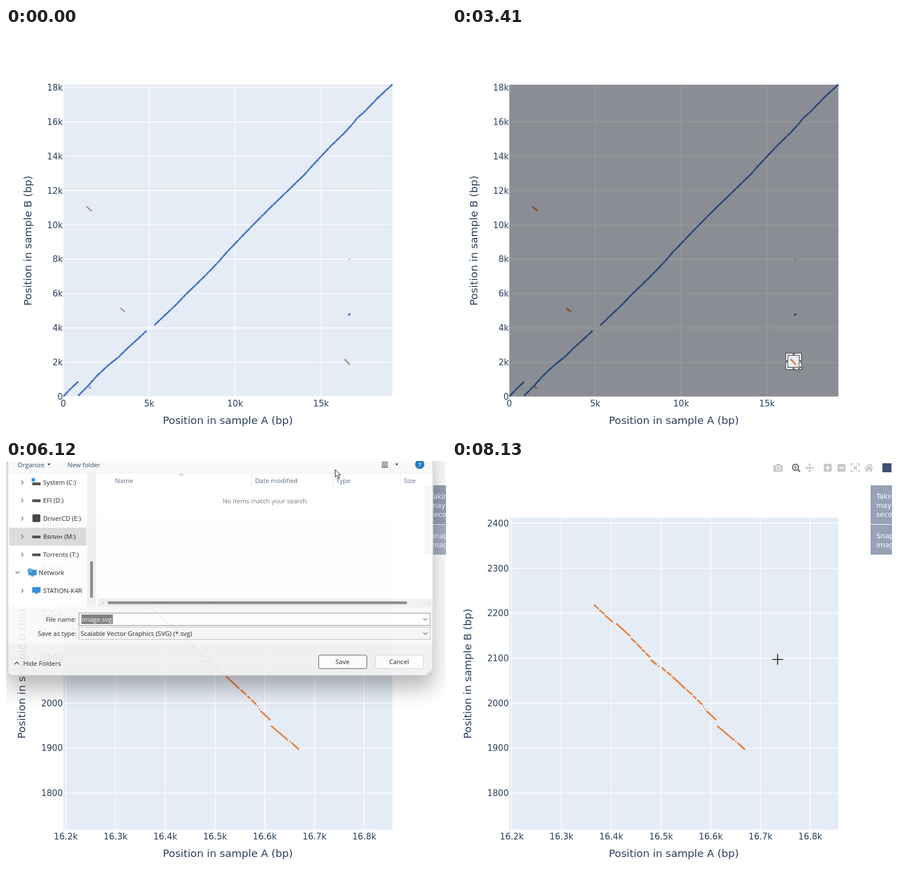
An HTML page that plays this animation: 780 by 718 pixels, repeating every 8.74 s.

```html
<!DOCTYPE html>
<html lang="en">
<head>
<meta charset="utf-8">
<title>Dot plot zoom and export</title>
<style>
  html, body { margin: 0; width: 100%; height: 100%; overflow: hidden; background: #fff; }
  svg { display: block; width: 780px; height: 718px; }
  .plot { font-family: "DejaVu Sans", Verdana, sans-serif; fill: #2a3f5f; }
  .tick { font-size: 15.1px; }
  .title { font-size: 18.5px; text-anchor: middle; }
  .note { font: 12.4px "DejaVu Sans", Verdana, sans-serif; fill: #fff; }
  .ui { font: 11.5px "Open Sans", "Noto Sans", sans-serif; fill: #111; }
  .line { fill: none; }
  #cross { mix-blend-mode: difference; }
</style>
</head>
<body>
<svg id="stage" viewBox="0 0 780 718" xmlns="http://www.w3.org/2000/svg"></svg>
<script>
const LOOP = 8740;
const BOX = { l: 101.5, t: 100.5, r: 685, b: 653.5 };
const START = { x: 596, y: 581 };

const text = (x, y, s, attrs = '') => `<text x="${x}" y="${y}" ${attrs}>${s}</text>`;
const rect = (x, y, w, h, fill, attrs = '') =>
  `<rect x="${x}" y="${y}" width="${w}" height="${h}" fill="${fill}" ${attrs}/>`;
const line = (d, color, width = 1, attrs = '') =>
  `<path class="line" d="${d}" stroke="${color}" stroke-width="${width}" ${attrs}/>`;
const range = n => [...Array(n).keys()];

// Axes: each has the pixel of its first tick, the step, the count and a label rule.
function axes(xa, ya, titleX) {
  const xs = range(xa.n).map(i => xa.at + i * xa.step);
  const ys = range(ya.n).map(i => ya.at - i * ya.step);
  const grid = xs.map(x => `M${x} ${BOX.t}V${BOX.b}`).join('') +
    ys.map(y => `M${BOX.l} ${y}H${BOX.r}`).join('');
  return rect(BOX.l, BOX.t, BOX.r - BOX.l, BOX.b - BOX.t, '#e5ecf6') +
    line(grid, '#fff', 1.35) +
    '<g class="plot">' +
    xs.map((x, i) => text(x, 670.5, xa.label(i), 'class="tick" text-anchor="middle"')).join('') +
    ys.map((y, i) => text(100.8, y + 5.5, ya.label(i), 'class="tick" text-anchor="end"')).join('') +
    text(393.25, 701.8, 'Position in sample A (bp)', 'class="title"') +
    text(0, 0, 'Position in sample B (bp)', `class="title" transform="translate(${titleX} 377) rotate(-90)"`) +
    '</g>';
}

function wholePlot() {
  const main = 'M102 653L114 640 128 627M128 652L146 634 150 629 163 615 180 599 200 583 214 569 235 550 249 537' +
    'M263 527L285 506 300 492 322 469 337 455 362 430 379 412 390 399 437 350 470 317 497 291 530 259 545 242' +
    ' 560 226 577 208 600 186 617 167 622 160 635 149 660 123 685 100';
  return axes(
    { at: 101.5, step: 152.35, n: 4, label: i => i ? i * 5 + 'k' : '0' },
    { at: 653.5, step: 60.88, n: 10, label: i => i ? i * 2 + 'k' : '0' }, 44.8) +
    line(main, '#7c9ad8', 2.5) +
    line(main, '#4472c4', 2.8, 'stroke-dasharray="13 1.4 6 1 19 1.6 4 1.2 9 1"') +
    line('M606.5 509.5L610.5 506.5', '#4472c4', 3) +
    line('M608 409.5L609.5 411', '#7c8db0', 2) +
    `<path id="inverted" class="line" d="M142.5 316.5L152 324.5M203 496.5L210.5 503M600 587L609.5 596.5M147 636L150.5 639"
      stroke-width="2.9"/>` +
    line('M600 587L604 591', '#e58a5c', 2.9, 'id="hint"');
}

function zoomPlot() {
  const runs = 'M252 255L260 262.5M261.5 264L270 271.5M271 273.5L285 285.5M291 288L316 310.5M317.5 314L326 322.5' +
    'M327.5 324L336 332.5M337 334L342 339M343.5 340.5L351 348M352.5 352.5L363 361M365.5 363L367 364.3M372 366L379 373' +
    'M381 374.5L389 380.5M390.5 382L414 404M416 405.5L426 414.5M428 416.5L433 421.5M435 423.5L444 432M445.5 434.5L446.5 435.7' +
    'M448.3 439.3L449.5 440.5M451 443L468.5 459M470 469.5L500 495M502.5 496.7L504 498M506 499.5L519.5 511.5';
  return axes(
    { at: 106, step: 88.2, n: 7, label: i => (16.2 + i / 10).toFixed(1) + 'k' },
    { at: 588.7, step: 79.73, n: 7, label: i => 1800 + i * 100 }, 34) +
    line(runs, '#ed7d31', 2.9);
}

function modebar() {
  const pale = '#c7c7c7', dark = '#7c7c7c';
  const tile = x => rect(x - 7, 5, 14, 14, pale, 'rx="2"');
  return `<g id="camera"><path d="M572 7.5h2.5l1.5-2.5h4.5l1.5 2.5h2a2 2 0 0 1 2 2v7.5a2 2 0 0 1-2 2h-12.500a2 2 0 0 1-2-2v-7.500a2 2 0 0 1 2-2z"/>
    <circle cx="578.200" cy="13" r="4.200" fill="#fff"/><circle cx="578.200" cy="13" r="2.700"/></g>` +
    `<circle cx="609" cy="11" r="5.300" fill="none" stroke="${dark}" stroke-width="2.500"/>` +
    line('M613 15L617 19', dark, 3) + line('M606 11H612M609 8V14', dark, 1.6) +
    line('M628 12H640M634 6V18', pale, 1.8) +
    `<path fill="${pale}" d="M634 3.500l3.200 4h-6.400zM634 20.500l3.200-4h-6.400zM625.800 12l4-3.200v6.400zM642.200 12l-4-3.200v6.400z"/>` +
    tile(666) + line('M662 12H670M666 8V16', '#fff', 2.2) +
    tile(690.5) + line('M686.500 12H694.500', '#fff', 2.2) +
    line('M707.500 9V5H711.500M718 5H722V9M722 15V19H718M711.500 19H707.500V15', pale, 1.7) +
    line('M711 8.500L718.500 15.500M718.500 8.500L711 15.500', pale, 1.9) +
    `<path fill="${pale}" d="M731 12.500L739 5L742 7.700V5.500H744V9.500L747 12.500L746 13.500L739 7.200L732 13.500ZM733.500 13.500L739 8.800L744.500 13.500V19H740.700V15H737.300V19H733.500Z"/>` +
    rect(763, 4, 16, 16, '#3f4f75');
}

function notice(id, y, h, rows) {
  return `<g id="${id}">` + rect(742, y, 160, h, '#97a1b7') +
    rows.map((s, i) => text(752, y + 23.5 + i * 16, s, 'class="note"')).join('') + '</g>';
}

function dialog() {
  const chevron = (x, y) => line(`M${x - 2} ${y - 3.5}l3.500 3.500l-3.500 3.500`, '#555', 1.1);
  const down = (x, y) => line(`M${x - 3.5} ${y - 2}l3.500 3.500l3.500-3.500`, '#555', 1.1);
  const caret = (x, y) => `<path d="M${x - 3} ${y - 1.5}h6l-3 3.500z" fill="#333"/>`;
  const drive = y => rect(44, y - 2, 15, 5, '#444', 'rx="1"');
  const screen = (x, y) => rect(x, y - 6, 15, 10, '#1f86d0', 'rx="1"') + rect(x + 5, y + 4, 5, 2, '#5d7487');
  const rows = ['System (C:)', 'EFI (D:)', 'DriverCD (E:)', 'Вялин (M:)', 'Torrents (T:)', '', 'STATION-K4R'];
  const rowY = i => 37.3 + i * 32.2;
  const tree = rect(3, 118, 138, 32, '#d9d9d9') +
    rows.map((s, i) => s ? chevron(26.5, rowY(i)) + text(63.5, rowY(i) + 4.2, s) : '').join('') +
    drive(39.3) + rect(43, 29.5, 6, 6, '#1f86d0') + drive(69.5) +
    rect(44.5, 94, 14, 14, '#333', 'rx="2"') + drive(134) + drive(166) +
    down(18, 198) + screen(37, 199) + '<circle cx="40" cy="195" r="4.500" fill="#4ba3d8"/>' +
    text(55.5, 202.4, 'Network') + screen(44, 230);
  const head = [[192, 'Name'], [442, 'Date modified'], [587, 'Type'], [707.5, 'Size']];
  return rect(0, -60, 760, 442, '#f0f0f0', 'rx="8" filter="url(#shadow)"') +
    rect(.5, -60, 759, 442, '#f0f0f0', 'rx="8" stroke="#b4b4b4"') +
    '<g class="ui">' +
    rect(1, -50, 758, 70, '#f9f9f9') + rect(1, 20, 758, 240, '#fff') + rect(1, 260, 758, 65, '#f9f9f9') +
    line('M1 20.500H759', '#ececec') +
    text(18, 9.7, 'Organize', 'fill="#1e395b"') + caret(74, 5) + text(107, 9.7, 'New folder', 'fill="#1e395b"') +
    line('M668 1H679M668 4H679M668 7H679M668 10H679', '#333', 1.3) + caret(695, 5) +
    '<circle cx="736" cy="5" r="8.300" fill="#0f6cbd"/>' + text(736, 9.5, '?', 'fill="#fff" text-anchor="middle" font-weight="600"') +
    `<g clip-path="url(#tree)">${tree}</g>` +
    rect(142, 21, 16, 239, '#f0f0f0') + rect(147.5, 178, 5, 65, '#858585') +
    head.map(([x, s]) => text(x, 38.3, s, 'fill="#4c607a"')).join('') +
    line('M435.500 21V46M580.500 21V46M701.500 21V46', '#e3e8ee') +
    line('M307 25l3.500-3.500l3.500 3.500', '#777') +
    text(460.5, 74.7, 'No items match your search.', 'fill="#6d6d6d" text-anchor="middle"') +
    rect(162, 244, 597, 16, '#f0f0f0') + rect(179, 249.5, 534, 5, '#858585') +
    '<path d="M172 249l-3.500 3l3.500 3zM751 249l3.500 3l-3.500 3z" fill="#d0d0d0"/>' +
    text(123, 286.3, 'File name:', 'text-anchor="end"') + text(123, 311.3, 'Save as type:', 'text-anchor="end"') +
    rect(127.5, 270.5, 627, 22, '#fff', 'id="nameBox"') + rect(132, 273, 56, 17, '#767676') +
    text(133, 286.3, 'image.svg', 'fill="#fff"') + down(746, 282) +
    rect(127.5, 295.5, 627, 22, '#f6f6f6', 'id="typeBox"') +
    text(130.5, 311.3, 'Scalable Vector Graphics (SVG) (*.svg)') + down(746, 307) +
    line('M12.500 362l4-4l4 4', '#333', 1.3) + text(28, 364.5, 'Hide Folders') +
    rect(555.5, 345.5, 86, 24, '#fdfdfd', 'id="save" rx="3"') + text(598, 361.3, 'Save', 'text-anchor="middle"') +
    rect(656.5, 345.5, 86, 24, '#fdfdfd', 'rx="3" stroke="#d0d0d0"') + text(699, 361.3, 'Cancel', 'text-anchor="middle"') +
    line('M756 372V381M753 375.500V381M750 379V381', '#aaa', 2, 'stroke-dasharray="2 1.500"') +
    '</g>';
}

const stage = document.getElementById('stage');
stage.innerHTML = `<defs>
    <clipPath id="tree"><rect x="1" y="21" width="140.500" height="239"/></clipPath>
    <filter id="shadow" x="-20%" y="-20%" width="140%" height="150%">
      <feDropShadow dx="0" dy="22" stdDeviation="20" flood-color="#000" flood-opacity=".32"/></filter>
  </defs>` + rect(0, 0, 780, 718, '#fff') +
  `<g id="whole">${wholePlot()}</g><g id="zoomed">${zoomPlot()}</g>
  <g id="select"><path id="mask" fill-rule="evenodd"/><path id="corners" fill="#fff" stroke="#444" stroke-width="1.200"/></g>
  <g id="bar">${modebar()}</g>
  <g id="tip"><path d="M578 20l6 7.500h-12z" fill="#69738a"/>${rect(490, 27, 106, 28, '#69738a', 'rx="2.500"')}
    ${text(543.5, 46, 'Download plot', 'class="note" style="font-size:12px" text-anchor="middle"')}</g>` +
  notice('note1', 43, 69, ['Taking snapshot - this', 'may take a few', 'seconds']) +
  notice('note2', 113, 53, ['Snapshot succeeded -', 'image.svg']) +
  `<g id="dialog">${dialog()}</g>
  <path id="cross" class="line" d="M-9.500 0H9.500M0-9.500V9.500" stroke="#fff" stroke-width="1.600"/>
  <path id="arrow" d="M0 0V13.500L3.200 10.500L5.500 15.500L7.700 14.500L5.500 9.700H9.500Z" fill="#fff" stroke="#000" stroke-width=".9"/>
  <path id="hand" d="M0 0.500q1.600-1.600 2.800.300v5l5.200 1q1.500.500 1.500 2.200l-.8 5.500v2.500h-6.500v-2l-4.500-5.500q-.500-1.700 1.800-1l.500.800z"
    fill="#fff" stroke="#000" stroke-width=".9"/>
  <circle id="click" r="12.200" fill="#f5f000" opacity=".65"/>`;

const ui = {};
stage.querySelectorAll('[id]').forEach(e => ui[e.id] = e);
const show = (e, on) => e.setAttribute('visibility', on ? 'visible' : 'hidden');
const set = (e, attrs) => { for (const k in attrs) e.setAttribute(k, attrs[k]); };
const ramp = (t, a, b) => Math.min(1, Math.max(0, (t - a) / (b - a)));
const easeOut = n => p => 1 - (1 - p) ** n;
const easeBoth = p => p * p * (3 - 2 * p);

// Pointer moves: start, end, x, y, easing, sideways bow
const moves = [
  [540, 1400, 597.5, 583, easeOut(2.2), 0],
  [1540, 1750, 595.5, 580.5, p => p, 0],
  [2200, 3130, 615.3, 601.5, easeOut(2.2), 0],
  [4330, 5130, 583.5, 15, easeBoth, 14],
  [6520, 7340, 577.3, 351.8, easeOut(3), 0]
];

function pointer(t) {
  let x = 690, y = 694;
  for (const [a, b, toX, toY, ease, bow] of moves) {
    if (t < a) break;
    const p = ease(ramp(t, a, b));
    x += (toX - x) * p + bow * Math.sin(Math.PI * p);
    y += (toY - y) * p;
  }
  return { x, y };
}

function drawSelection(t, p) {
  const on = t >= 2380 && t < 3460;
  show(ui.select, on);
  if (!on) return;
  const { x: l, y: t0 } = START, r = p.x - .3, b = p.y - .3;
  const arm = Math.min(r - l, b - t0) / 2 - .2;
  const corner = (x, y, sx, sy) =>
    `M${x - 4.4 * sx} ${y + (arm - .6) * sy}h${3.8 * sx}v${-arm * sy}h${arm * sx}v${-3.8 * sy}h${-(arm + 3.8) * sx}z`;
  set(ui.mask, {
    d: `M${BOX.l} ${BOX.t}H${BOX.r}V${BOX.b}H${BOX.l}ZM${l} ${t0}H${r}V${b}H${l}Z`,
    'fill-opacity': .4 * ramp(t, 2400, 2560)
  });
  set(ui.corners, {
    d: corner(l, t0, 1, 1) + corner(r, t0, -1, 1) + corner(r, b, -1, -1) + corner(l, b, 1, -1),
    opacity: ramp(t, 2380, 2520)
  });
}

function render(t) {
  const p = pointer(t);
  const zoomed = t >= 3460;
  show(ui.whole, !zoomed);
  show(ui.zoomed, zoomed);
  set(ui.inverted, { stroke: t < 2130 ? '#a19a9a' : '#ed7d31' });
  show(ui.hint, t >= 1540 && t < 2130);
  drawSelection(t, p);

  const onCamera = t > 4330 && t < 5900 && p.y < 22;
  set(ui.bar, {
    opacity: ramp(t, 540, 840) - ramp(t, 2250, 2540) + ramp(t, 3460, 3670) - ramp(t, 5850, 6100) + ramp(t, 7480, 7800)
  });
  set(ui.camera, { fill: onCamera ? '#7c7c7c' : '#c7c7c7' });
  show(ui.tip, onCamera);
  set(ui.note1, { opacity: ramp(t, 5830, 6000) });
  set(ui.note2, { opacity: ramp(t, 5960, 6150) });

  const open = easeOut(3)(ramp(t, 5900, 6300)) - ramp(t, 7400, 7640);
  const scale = .92 + .08 * open;
  set(ui.dialog, { opacity: open, transform: `translate(380 150) scale(${scale}) translate(-380 -150)` });
  show(ui.dialog, open > 0);
  const over = (a, b) => t > 6520 && p.y > a && p.y < b;
  const onSave = over(345, 370);
  set(ui.nameBox, { stroke: over(270, 293) ? '#333' : '#868686' });
  set(ui.typeBox, { stroke: over(295, 318) ? '#0078d4' : '#b9b9b9' });
  set(ui.save, { stroke: onSave ? '#0078d4' : '#444', fill: onSave ? '#e0eef9' : '#fdfdfd' });

  const inPlot = p.y > BOX.t && p.y < BOX.b && p.x < BOX.r;
  const inDialog = t >= 5900 && t < 7480;
  const kind = t < 540 ? '' : onCamera ? 'hand' : inPlot && !inDialog ? 'cross' : 'arrow';
  for (const name of ['cross', 'arrow', 'hand']) {
    show(ui[name], name === kind);
    set(ui[name], { transform: `translate(${p.x} ${p.y})` });
  }
  const pressed = t >= 2130 && t < 3410 || t >= 5600 && t < 5830 || t >= 7340 && t < 7470;
  show(ui.click, pressed);
  set(ui.click, { cx: p.x, cy: p.y });
}

function tick() {
  render(performance.now() % LOOP);
  requestAnimationFrame(tick);
}
tick();
</script>
</body>
</html>
```
